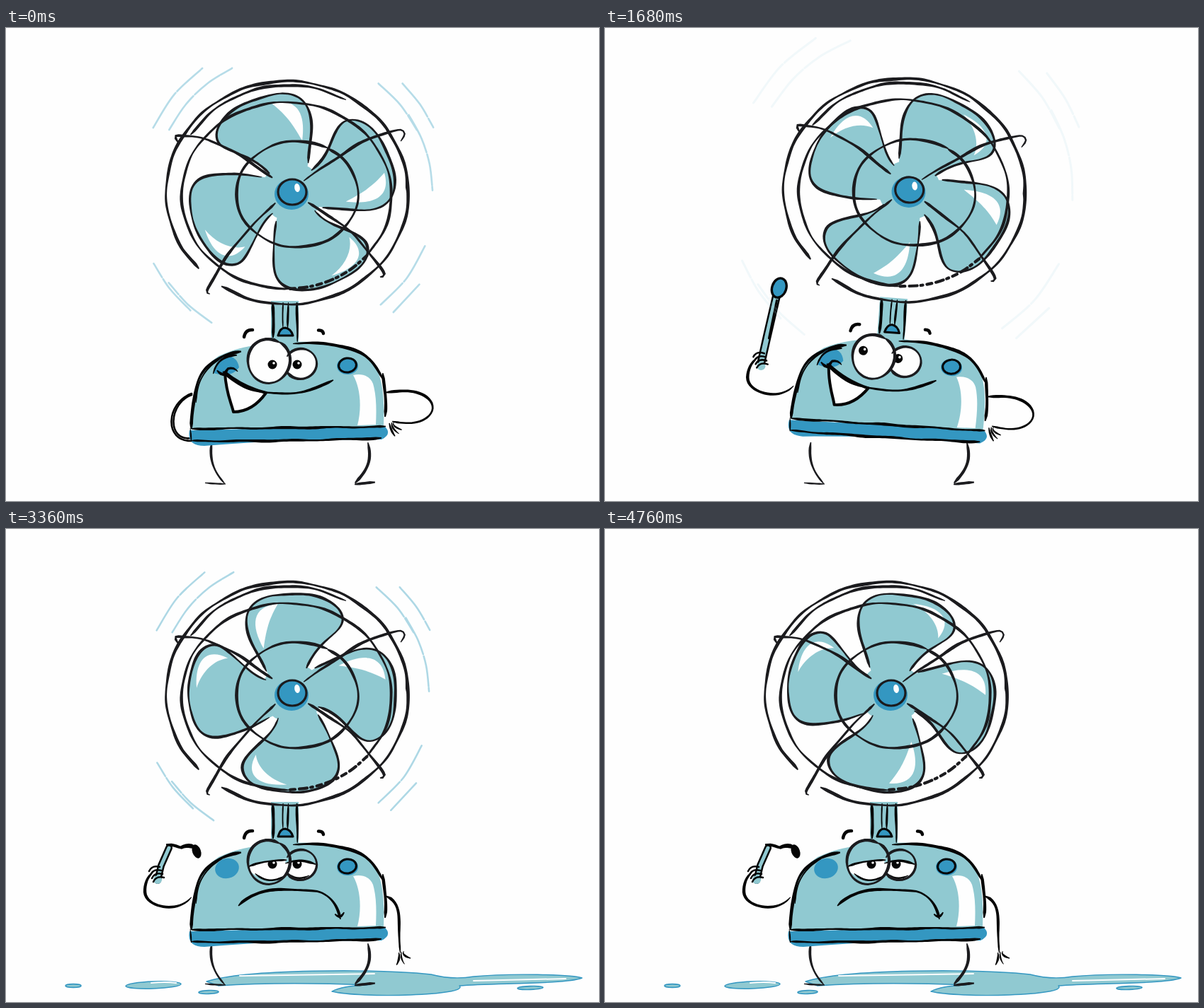
An HTML page that plays this animation: 837 by 669 pixels, repeating every 5040 ms.

```html
<!DOCTYPE html>
<html lang="en">
<head>
<meta charset="utf-8">
<title>Fan with a match</title>
<style>
html, body { margin: 0; width: 100%; height: 100%; overflow: hidden; background: #fefefe; }
svg { display: block; width: 100%; height: 100%; }
path, ellipse { stroke-linecap: round; stroke-linejoin: round; }
</style>
</head>
<body>
<svg id="stage" viewBox="0 0 837 669"></svg>
<script>
const LIGHT = "#90c9d1", DARK = "#3497c1", INK = "#1b1b1e", BLACK = "#050505", WHITE = "#fefefe";
const STEP = 280, STEPS = 18, RAD = Math.PI / 180;
const stage = document.getElementById("stage");

function add(parent, tag, attrs = {}) {
  const el = document.createElementNS("http://www.w3.org/2000/svg", tag);
  for (const k in attrs) el.setAttribute(k, attrs[k]);
  return parent.appendChild(el);
}
const group = (parent, attrs) => add(parent, "g", attrs);
const fill = (g, d, color) => add(g, "path", { d, fill: color });
const line = (g, d, w, color = BLACK, extra = {}) =>
  add(g, "path", { d, fill: "none", stroke: color, "stroke-width": w, ...extra });
const oval = (g, x, y, rx, ry, color, stroke = "none", w = 3, turn = 0) =>
  add(g, "ellipse", { cx: x, cy: y, rx, ry, fill: color, stroke, "stroke-width": w, transform: `rotate(${turn} ${x} ${y})` });
const show = (el, on) => el.setAttribute("display", on ? "inline" : "none");
const polar = (x, y, rx, ry, deg) => [x + rx * Math.cos(deg * RAD), y + ry * Math.sin(deg * RAD)];

// Smooth path through a few points.
function curve(text) {
  const p = text.split(" ").map(q => q.split(",").map(Number));
  const at = i => p[Math.max(0, Math.min(p.length - 1, i))];
  const lean = (u, v, w) => u.map((c, k) => (c + (w[k] - v[k]) / 6).toFixed(1));
  let d = "M" + p[0];
  for (let i = 1; i < p.length; i++)
    d += `C${lean(at(i - 1), at(i - 2), at(i))} ${lean(at(i), at(i + 1), at(i - 1))} ${at(i)}`;
  return d;
}
function arc(x, y, rx, ry, from, to) {
  const n = Math.ceil((to - from) / 15);
  return curve(Array.from({ length: n + 1 }, (_, i) => polar(x, y, rx, ry, from + (to - from) * i / n).join()).join(" "));
}

// Brush stroke: a ribbon along the path whose width swells and tapers.
let seed = 1;
function ink(g, d, w = 3.8, color = BLACK) {
  const path = fill(g, d, color), len = path.getTotalLength(), n = Math.ceil(len / 4), s = seed += 1.7;
  const left = [], right = [];
  for (let i = 0; i <= n; i++) {
    const t = len * i / n, p = path.getPointAtLength(t);
    const a = path.getPointAtLength(Math.max(0, t - 1)), b = path.getPointAtLength(Math.min(len, t + 1));
    const turn = Math.atan2(b.y - a.y, b.x - a.x), nx = -Math.sin(turn), ny = Math.cos(turn);
    const swell = 0.88 + 0.2 * Math.sin(t * 0.04 + s) + 0.1 * Math.sin(t * 0.13 + s * 2);
    const r = w / 2 * swell * Math.min(1, 0.4 + Math.min(t, len - t) / 12), off = 0.5 * Math.sin(t * 0.09 + s * 3);
    left.push([p.x + nx * (off + r), p.y + ny * (off + r)].map(v => v.toFixed(1)));
    right.unshift([p.x + nx * (off - r), p.y + ny * (off - r)].map(v => v.toFixed(1)));
  }
  path.setAttribute("d", `M${left.join("L")}L${right.join("L")}Z`);
}
const stroke = (g, pts, w, color) => ink(g, curve(pts), w, color);

function fingers(g, x, y, from, spread, len) {
  for (let i = 0; i < 3; i++) {
    const [a, b] = polar(x, y, len, len, from + i * spread);
    ink(g, `M${x + i * 3} ${y - i}Q${x + 2} ${(y + b) / 2} ${a} ${b}`, 3.4);
  }
}

// Puddle
const puddle = group(stage);
const pool = "M283 640C340 622 520 622 600 630Q630 638 660 633C710 628 800 630 813 635C790 644 690 642 640 646C655 660 500 664 460 654Q475 646 510 645Q390 640 300 646Z";
fill(puddle, pool, LIGHT);
line(puddle, pool, 1.4, DARK);
for (const [x, y, rx, ry] of [[208, 645, 39, 5], [286, 655, 14, 2.4], [740, 649, 18, 2.4]])
  oval(puddle, x, y, rx, ry, LIGHT, DARK, 1.6, -2);
line(puddle, "M205 642Q225 640 240 642M660 639L790 636M330 632L520 629", 2, WHITE);
const farDrop = oval(puddle, 95, 646, 11, 2.4, LIGHT, DARK, 1.6);

// Legs
for (const mirror of ["", "translate(802) scale(-1 1)"]) {
  const leg = group(stage, { transform: mirror });
  ink(leg, "M291 586C286 612 292 626 309 644", 4, INK);
  ink(leg, "M281 643L310 645", 4, INK);
}

const fan = group(stage);

// Arms
const arms = { back: group(fan), low: group(fan), up: group(fan), bent: group(fan), hang: group(fan) };
for (const r of [0, 4])
  line(arms.back, `M262 ${517 + r / 2}C${226 + r} 530 ${222 + r} 585 262 ${584 - r}`, 2.6);
ink(arms.low, "M263 515C175 500 175 575 262 570");
line(arms.low, "M232 514C190 525 193 555 237 566", 1.8);
ink(arms.up, "M262 521C245 542 195 538 196 512Q197 495 208 485");
ink(arms.bent, "M536 515C625 502 622 570 545 557");
fingers(arms.bent, 541, 559, 65, -18, 20);
ink(arms.hang, "M536 519C560 528 554 560 556 599");
fingers(arms.hang, 555, 599, 102, -38, 18);

// Neck and body
fill(fan, "M374 386H413V448H374Z", LIGHT);
fill(fan, "M261 568C263 520 268 485 300 464C330 450 365 445 400 444C455 442 505 450 522 480C533 500 534 530 533 563Z", LIGHT);
fill(fan, "M490 491C502 488 514 492 518 503C523 520 523 540 522 561L496 562C502 540 501 510 490 491Z", WHITE);
fill(fan, "M259 569Q400 566 534 563Q546 574 530 582L400 583Q330 587 280 591Q255 591 259 569Z", DARK);
ink(fan, "M262 567C263 500 275 465 332 458", 4.6);
ink(fan, "M268 530C270 495 285 475 305 467", 3);
ink(fan, "M405 446C490 443 515 460 533 498", 4.4);
ink(fan, "M532 488Q537 520 535 550", 4);
ink(fan, "M262 567L536 564");
ink(fan, "M262 584Q400 585 530 580");
ink(fan, "M260 566L261 585", 3);
for (const [x, len, w] of [[377, 50, 4], [411, 56, 4], [391, 36, 3], [398, 36, 3]]) ink(fan, `M${x} 388l0 ${len}`, w);
add(fan, "path", { d: "M384 435Q387 424 394 424Q402 425 405 435Z", fill: DARK, stroke: BLACK, "stroke-width": 3 });
line(fan, "M336 437Q338 426 348 427M441 427.500Q447 427 448 432", 4.5);
oval(fan, 482, 478, 15, 12, DARK);
oval(fan, 482, 477, 12.5, 10, DARK, BLACK, 3, -8);

// Mouths
const smile = group(fan);
fill(smile, "M293 488C296 460 325 456 329 480Q318 496 293 488Z", DARK);
add(smile, "path", { d: "M309 487C310 515 318 530 321 543Q348 543 367 516Q335 508 309 487Z", fill: WHITE, stroke: BLACK, "stroke-width": 4 });
ink(smile, "M306 486C340 522 410 528 462 498", 4);
ink(smile, "M298 484Q309 497 312 483Q320 479 327 486", 4.5);
ink(smile, "M292 489C297 468 312 464 326 463", 4);
const frown = group(fan);
oval(frown, 312, 480, 17, 14, DARK, "none", 0, -15);
ink(frown, "M328 533C350 505 405 508 440 513Q468 522 472 552", 4);
ink(frown, "M464 545Q472 553 477 542", 4);

// Eyes
const open = group(fan), lids = group(fan), closed = group(fan);
oval(open, 371, 471, 29, 30, WHITE);
oval(open, 415, 475, 23, 21, WHITE);
const pupils = [376, 411].map(x => {
  const g = group(open);
  oval(g, x, 476, 6.5, 6.5, BLACK);
  oval(g, x + 2, 474, 1.8, 1.8, WHITE);
  return g;
});
fill(lids, "M342 476C340 430 398 426 400 466Q370 468 342 476Z", LIGHT);
fill(lids, "M394 472C398 446 440 446 438 474Q415 466 394 472Z", LIGHT);
fill(lids, "M342 482Q370 508 400 486Q390 506 368 503Q348 500 342 482Z", LIGHT);
ink(lids, "M342 478Q370 467 396 468");
ink(lids, "M394 473Q415 466 437 474");
ink(lids, "M352 487Q372 505 393 491", 2.6);
ink(lids, "M398 487Q412 498 428 490", 2.6);
oval(closed, 371, 469, 29, 28, LIGHT);
oval(closed, 415, 475, 23, 20, LIGHT);
ink(closed, "M345 483Q370 503 399 480");
ink(closed, "M396 485Q415 497 434 480");
ink(fan, arc(371, 471, 30, 31, -60, 300), 4.2, INK);
ink(fan, arc(416, 475, 23, 21, -150, 150), 4.2, INK);

// Matches
const stick = (g, d, w) => [[w, BLACK], [w - 5, LIGHT]].forEach(([k, c]) => line(g, d, k, c));
const low = group(fan), lit = group(fan), sparks = group(fan), burnt = group(fan), grip = group(fan);
stick(low, "M251 547L264 576L289 630", 12);
oval(low, 290, 637, 9, 12, DARK, BLACK, 3.6, -12);
stick(lit, "M214 489L219 455L228 396", 12);
line(lit, "M222 456L229 402", 3);
oval(lit, 231, 384, 10, 14, DARK, BLACK, 3.4, 14);
for (let i = 0; i < 11; i++) {
  const a = -166 + i * 21, r = 24 + (i % 3) * 4;
  line(sparks, `M${polar(231, 382, r, r, a)}L${polar(231, 382, r + 8, r + 8, a)}`, 2, "#f8dcbb");
}
stick(burnt, "M214 497L219 476L230 451", 10);
ink(burnt, "M226 446Q240 446 246 451Q258 445 268 452", 7);
oval(burnt, 269, 456, 6, 10, BLACK, "none", 0, -20);
oval(grip, 214, 496, 6, 6, LIGHT);
for (let i = 0; i < 4; i++) line(grip, `M${202 + i * 2} ${484 + i * 5}q4 -9 15 -6`, 2.5);

// Blades
const head = group(fan);
oval(head, 404, 232, 44, 42, LIGHT);
const EDGE = "M-32-36C-40-58-52-85-52-108C-52-136-30-146 0-146C45-146 84-128 84-102C84-80 42-70 24-34";
const blades = [0, 1, 2, 3].map(() => {
  const g = group(head);
  fill(g, EDGE + "L14 6H-14Z", LIGHT);
  const sides = ["M-32-70C-46-105-42-134-4-133C-17-115-24-102-32-70Z", "M24-133C64-131 82-112 62-84C62-103 48-122 24-133Z"]
    .map(d => fill(g, d, WHITE));
  ink(g, EDGE, 3.8, INK);
  return { g, sides };
});

// Cage
ink(head, arc(397, 233, 171, 158, 137, 483), 4.2, INK);
ink(head, arc(398, 235, 164, 154, 213, 300), 4, INK);
ink(head, arc(394, 233, 173, 158, 325, 360), 4, INK);
ink(head, arc(396, 237, 148, 132, 88, 400), 3.8, INK);
line(head, arc(396, 237, 148, 132, 40, 88), 4.2, INK, { "stroke-dasharray": "7 6 3 5 11 6" });
ink(head, arc(411, 235, 86, 75, -60, 300), 4, INK);
for (const spoke of [
  "243,163 239,153 252,153 285,158 330,180 376,212", "557,160 562,149 550,145 500,163 420,216",
  "288,376 286,366 325,305 380,247", "426,247 485,287 531,343 528,352"
]) stroke(head, spoke, 4, INK);
oval(head, 403, 235, 24, 22, DARK);
oval(head, 404, 232, 20, 18, DARK, INK, 3.2);
oval(head, 411, 226, 3.8, 6, WHITE, "none", 0, -10);

// Wind: arcs of radius, first and last angle
const wind = group(head);
for (const [r, from, to] of [
  [222, 205, 234], [200, 207, 244], [223, -45, -25], [200, -52, -27], [201, -34, -1],
  [205, 22, 52], [225, 36, 50], [225, 131, 153], [221, 122, 144]
]) line(wind, arc(405, 233, r, r, from, to), 2.7, "#a9d6e4", { "stroke-dasharray": "60 3 45 2" });

// Bucket
const bucket = group(stage);
ink(bucket, "M62 411L36 421");
ink(bucket, "M46 444L-4 486", 4.4);
for (const y of [0, 4]) line(bucket, `M-8 ${558 + y}Q40 ${530 + y} 118 516`, 2.4);
fill(bucket, "M65 390L60 485Q64 503 92 512Q130 522 146 510L182 408Z", LIGHT);
fill(bucket, "M150 424L168 420L152 482Q147 500 138 506Z", WHITE);
ink(bucket, "M65 394L60 478Q66 510 124 515", 4.2);
ink(bucket, "M181 412L150 512", 4.2);
for (let i = 0; i < 3; i++) ink(bucket, `M64 ${441 + i * 21}q40 16 ${92 - i * 6} 11`, 3.2);
oval(bucket, 125, 391, 68, 14, LIGHT, BLACK, 3.6, 10);
oval(bucket, 125, 391, 57, 7, DARK, BLACK, 2.6, 10);
oval(bucket, 130, 423, 8, 7, DARK, BLACK, 3);
ink(bucket, "M122 425L83 436", 3.2);
line(bucket, "M34 434Q58 438 80 436", 14, BLACK);
line(bucket, "M34 434Q58 438 80 436", 9, DARK);
oval(bucket, 33, 428, 11, 10, DARK, BLACK, 4);

// Water
const water = group(stage);
const gush = "M152 398C185 362 235 285 294 259Q303 264 302 284C375 252 420 205 470 182Q518 158 511 190C495 255 450 285 405 303Q390 292 394 268C340 300 250 372 188 404Z";
const drop = "M283 241C300 220 318 188 339 183Q342 198 283 241Z";
for (const d of [gush, drop]) {
  fill(water, d, LIGHT);
  line(water, d, 2.8, DARK);
}
ink(water, "M304 278Q395 232 450 187", 3.4, DARK);
line(water, "M398 294Q465 275 502 205", 2, "#b9dfe8");
line(water, "M205 342Q240 298 283 266", 3.4, WHITE);
line(water, "M402 300Q403 282 414 290", 2.6, DARK);
fill(water, "M452 205Q478 178 503 178Q503 194 452 205Z", WHITE);

// Seven fan drawings in turn: angle, lean of the tips, direction of the light
const POSES = [[-14, -1, 45], [-24, -1, 45], [32, 1, -135], [3, 1, -45], [2, 1, -135], [-7, 1, -135], [20, 1, -45]];
const WIND = [233, 212, 195, 0];
const SWAY = [0, 1.9, -2.5, -1.5, 4.3];

function drawFan(n) {
  const tilt = n < 9 ? SWAY[Math.min(n, 4)] : n === 9 ? 2 : 0;
  fan.setAttribute("transform", `translate(0 ${-tilt}) rotate(${tilt} 400 575)`);

  const [turn, lean, light] = POSES[n % POSES.length];
  blades.forEach(({ g, sides }, i) => {
    const angle = turn + 90 * i;
    g.setAttribute("transform", `translate(404 232) scale(1 .96) rotate(${angle}) scale(${lean} 1)`);
    const outer = Math.sin((light - angle + 90) * RAD) * lean > 0;
    show(sides[0], !outer);
    show(sides[1], outer);
  });

  // Wind pulses while the fan is lively, then spreads in a cycle of four.
  const size = n === 8 ? 0 : n < 5 ? (n % 2 ? 226 : 200) : WIND[(n + 2) % 4];
  show(wind, size);
  wind.setAttribute("transform", `translate(405 233) scale(${size / 204}) translate(-405 -233)`);
  wind.setAttribute("opacity", Math.min(1, 1 - (size - 192) / 48));
}

function drawScene(n) {
  const doused = n > 7, sad = n > 9, shut = doused && !sad, raised = n > 2;
  const shown = [
    [arms.back, n < 2], [arms.low, n === 2], [low, n === 2], [arms.up, raised], [grip, raised],
    [lit, raised && !doused], [sparks, n === 4], [burnt, doused], [arms.bent, !doused], [arms.hang, doused],
    [smile, !sad], [frown, sad], [open, !shut], [closed, shut], [lids, sad],
    [bucket, n > 6 && n < 11], [water, shut], [puddle, n > 8], [farDrop, sad]
  ];
  shown.forEach(([el, on]) => show(el, on));

  const look = sad || n < 2 ? 0 : n < 4 ? 0.9 : 1.25;
  pupils.forEach((g, i) => g.setAttribute("transform", `translate(${look * (i ? -4 : -16)} ${look * (i ? -4 : -10) - (sad ? 2 : 0)})`));

  bucket.setAttribute("transform", n === 7 ? "translate(-105 0)" : sad ? "translate(-130 -70)" : "");
  water.setAttribute("transform", sad || n < 9 ? "" : "translate(165 70)");
  puddle.setAttribute("transform", sad ? "" : "translate(36 42) scale(.935)");
}

let last = -1;
const start = performance.now();
function tick() {
  const n = Math.floor((performance.now() - start) / STEP) % STEPS;
  if (n !== last) {
    last = n;
    drawFan(n);
    drawScene(n);
  }
  requestAnimationFrame(tick);
}
tick();
</script>
</body>
</html>
```
